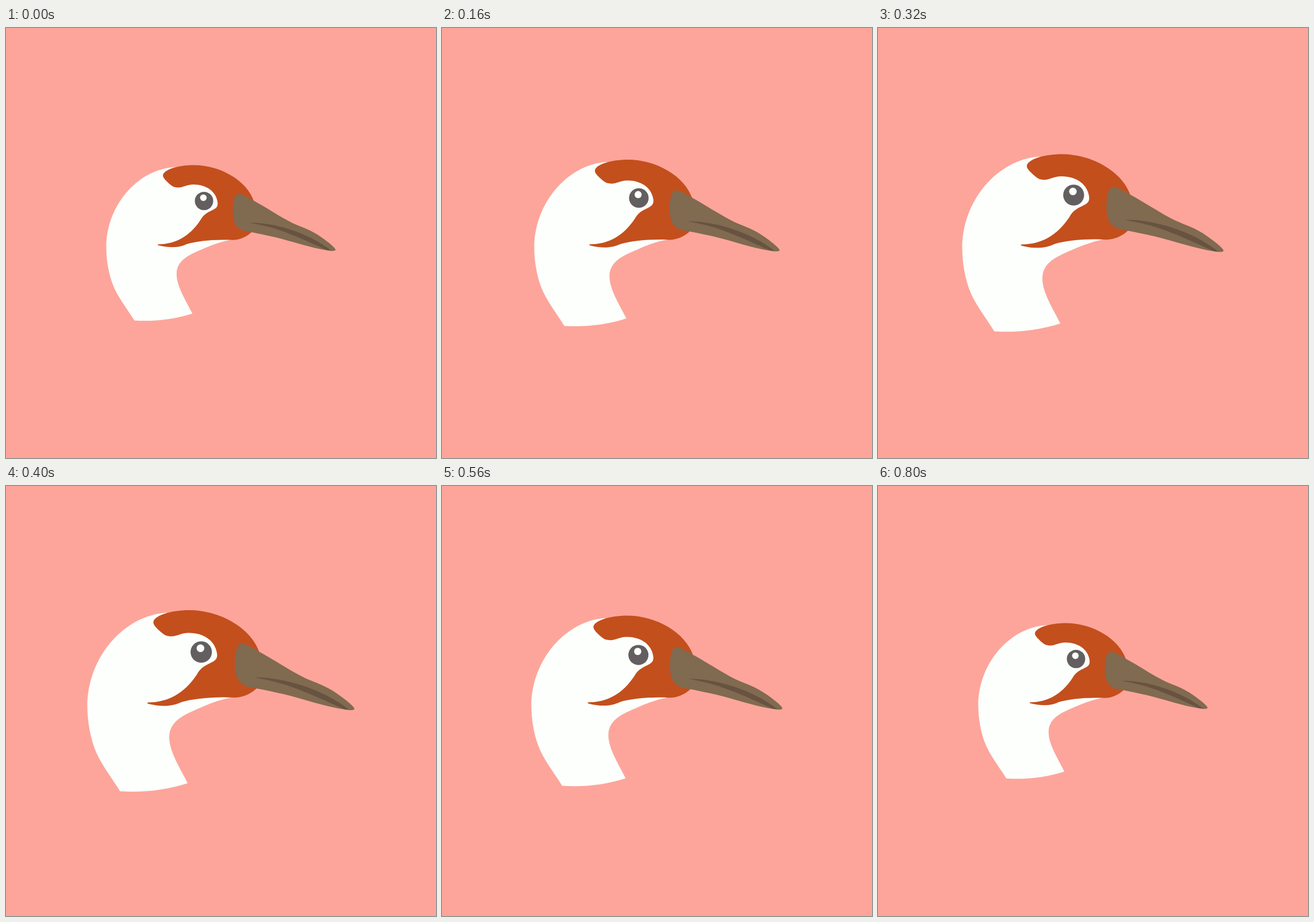
Animation, 748 px wide and 748 px high, one loop 0.84 s. Source, as an HTML page with a canvas:

```html
<!DOCTYPE html>
<html lang="en">
<head>
<meta charset="utf-8">
<title>Crane</title>
<style>
  html, body { margin: 0; width: 100%; height: 100%; overflow: hidden; background: #fda59b; }
  canvas { display: block; width: 748px; height: 748px; }
</style>
</head>
<body>
<canvas id="stage" width="748" height="748"></canvas>
<script>
const SIZE = 748, CENTER = SIZE / 2;
const LOOP = 840, STEP = 40;
const DRAWN_SCALE = 1.165;   // scale at which the paths below are laid out
const PEAK_TIME = 388.6, PEAK_GROWTH = 0.17;

const ctx = document.getElementById('stage').getContext('2d');

const circle = (x, y, r) => {
  const path = new Path2D();
  path.arc(x, y, r, 0, Math.PI * 2);
  return path;
};

const head = new Path2D(`M198.5 531 C240 533.5 278 529 316 517
  C303 491 284 462 284 437 C284 405 318 395 342 384 C360 376 376 371 393 367.5
  L395 270 L300 225 L278 220.5 C203 226 141.5 300 141.5 383
  C141.5 410 147 437 154 456 C163 481 181 503 198.5 531Z`);

const mask = new Path2D(`M256.5 236 C258 226 285 216 319 216
  C372 216 427 247 441 290 L436 352 C427 361 412 368 398 368
  C360 366 325 370 305 376 C290 383 273 385 248 379 C245 378 245 376.5 248 376.5
  C282 376 310 361 332 328 C340 313 351 311 361 305 C366 302 368 298 367 291
  C364 270 345 255.5 318 255.5 C299 256 296 265 278 260
  C272 257 266 251 261 246 C257 241 256 239 256.5 236Z`);

const beak = new Path2D(`M407 275 C412 272 425 279 440 288
  C466 302 492 320 520 334 C540 343 556 347 577 362 C590 371 605 383 606 387
  C607 391 596 390 590 389 C552 383 520 371 483 362 C460 357 442 353 424 350
  C404 346 398 330 398 311 C398 295 400 279 407 275Z`);

const mouth = new Path2D(`M432 333 C475 332 548 350 597 389.5 L588 388
  C560 376 536 364 514 356 C485 344 460 338 432 333Z`);

const layers = [
  [head, '#fcfffc'],
  [mask, '#c34f1d'],
  [beak, '#806a50'],
  [mouth, '#685241'],
  [circle(339.6, 288.8, 18.6), '#635f60'],
  [circle(338.3, 282.3, 6.7), '#fcfffc'],
];

// Linear growth to the peak, then back at the same rate and a short rest.
function scaleAt(time) {
  const t = Math.floor((time % LOOP) / STEP) * STEP;
  return 1 + PEAK_GROWTH * Math.max(0, 1 - Math.abs(t - PEAK_TIME) / PEAK_TIME);
}

function draw(time) {
  const k = scaleAt(time) / DRAWN_SCALE;
  ctx.setTransform(1, 0, 0, 1, 0, 0);
  ctx.fillStyle = '#fda59b';
  ctx.fillRect(0, 0, SIZE, SIZE);
  ctx.translate(CENTER, CENTER);
  ctx.scale(k, k);
  ctx.translate(-CENTER, -CENTER);
  for (const [path, color] of layers) {
    ctx.fillStyle = color;
    ctx.fill(path);
  }
}

let start;
function tick() {
  const now = performance.now();
  start ??= now;
  draw(now - start);
  requestAnimationFrame(tick);
}
tick();
</script>
</body>
</html>
```
